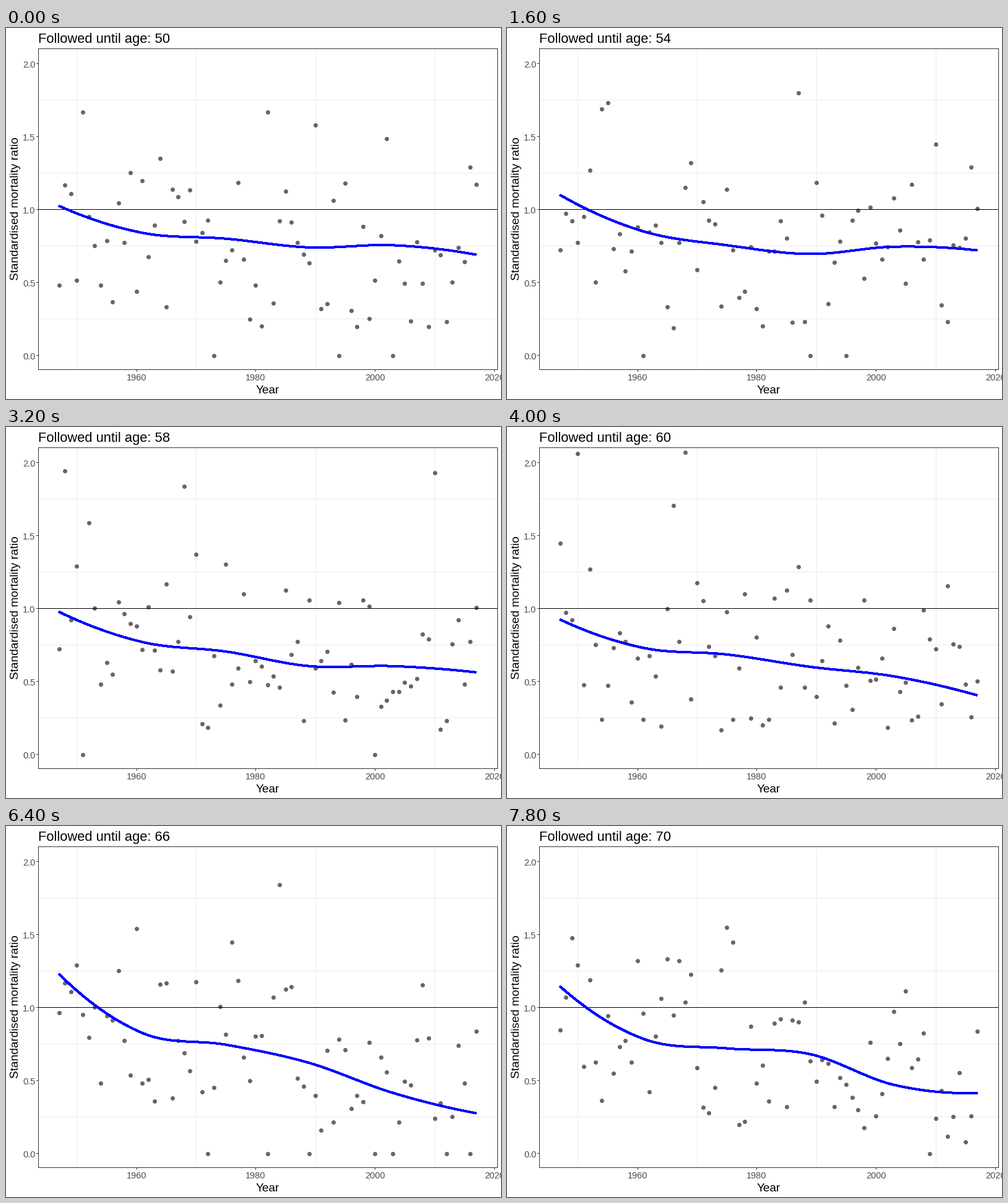
A matplotlib script for the animation above (8 s loop, 800x600 px).

```python
import numpy as np
import matplotlib.pyplot as plt
from matplotlib.animation import FuncAnimation

W, H, DPI = 800, 600, 100
PX = 72 / DPI                      # points per pixel
FRAMES, INTERVAL = 40, 200
INK, GRID, TICK_TEXT = "#333333", "#ebebeb", "#4d4d4d"

plt.rcParams["font.family"] = "Liberation Sans"

# Trend in 1947, 1961, 1975, 1989, 2003 and 2017, by age
TREND = {
    50: (1.025, 0.84, 0.80, 0.74, 0.755, 0.69),
    54: (1.10, 0.85, 0.755, 0.695, 0.745, 0.72),
    56: (1.03, 0.81, 0.725, 0.61, 0.675, 0.72),
    60: (0.925, 0.73, 0.685, 0.60, 0.535, 0.405),
    63: (1.17, 0.815, 0.765, 0.605, 0.47, 0.39),
    66: (1.23, 0.825, 0.745, 0.62, 0.415, 0.275),
    69: (1.145, 0.785, 0.72, 0.68, 0.47, 0.415),
}

years = np.arange(1947, 2018)
ages = np.arange(50, 71)
key_frames = np.round(1.98 * (ages - 50))


def x_of(year):
    return 85.5 + 9.636 * (year - 1947)


def y_of(ratio):
    return 529.5 - 236 * ratio


def crisp(v):
    """Centre of the nearest pixel."""
    return np.floor(v + 0.49) + 0.5


def smooth(knots):
    """Cubic Hermite curve through evenly spaced knots, one value per year."""
    p = np.array(knots)
    m = np.gradient(p, edge_order=2)
    u = np.linspace(0, len(p) - 1, len(years))
    i = np.minimum(u.astype(int), len(p) - 2)
    t = u - i
    return ((2 * t**3 - 3 * t**2 + 1) * p[i] + (t**3 - 2 * t**2 + t) * m[i]
            + (3 * t**2 - 2 * t**3) * p[i + 1] + (t**3 - t**2) * m[i + 1])


def blend(at, keys, rows):
    """Linear mix of the two rows around a position."""
    i = int(np.clip(np.searchsorted(keys, at, "right") - 1, 0, len(keys) - 2))
    t = np.clip((at - keys[i]) / (keys[i + 1] - keys[i]), 0, 1)
    return rows[i] * (1 - t) + rows[i + 1] * t


def make_ratios(curves, keep=0.6):
    """Observed over expected deaths; some deaths carry over to the next age."""
    rng = np.random.default_rng(11)
    expected = rng.uniform(3.8, 6.5, len(years))
    deaths = rng.poisson(expected * curves[0])
    rows = []
    for curve in curves:
        rows.append(np.minimum(deaths / expected, 2.07))
        deaths = (rng.binomial(deaths, keep)
                  + rng.poisson((1 - keep) * expected * curve))
    return rows


trend_rows = [smooth(k) for k in TREND.values()]
curves = [blend(a, list(TREND), trend_rows) for a in ages]
ratios = make_ratios(curves)

fig = plt.figure(figsize=(W / DPI, H / DPI), dpi=DPI, facecolor="white")
ax = fig.add_axes([0, 0, 1, 1])
ax.set(xlim=(0, W), ylim=(H, 0))
ax.axis("off")


def rule(x, y, color, z):
    ax.plot(x, y, color=color, lw=PX, zorder=z, snap=False,
            solid_capstyle="butt", solid_joinstyle="miter")


def label(x, y, s, px, color="black", ha="center", **kw):
    return ax.text(x, y, s, fontsize=px * PX, color=color, ha=ha,
                   va="baseline", **kw)


L, R, T, B = 52.5, 794.5, 33.5, 552.5
for year in (1950, 1970, 1990, 2010):
    rule([crisp(x_of(year))] * 2, [T, B], GRID, 1)
for ratio in (0.25, 0.75, 1.25, 1.75):
    rule([L, R], [crisp(y_of(ratio))] * 2, GRID, 1)
rule([L, R], [crisp(y_of(1))] * 2, "black", 3)
rule([L, R, R, L, L, R], [T, T, B, B, T, T], INK, 5)

for ratio in (0, 0.5, 1, 1.5, 2):
    y = crisp(y_of(ratio))
    rule([49, L], [y, y], INK, 5)
    label(47.5, y + 6, f"{ratio:.1f}", 14.5, TICK_TEXT, "right")
for year in (1960, 1980, 2000, 2020):
    x = crisp(x_of(year))
    rule([x, x], [B, 556], INK, 5)
    label(x, 570, str(year), 14.5, TICK_TEXT)

label(422.5, 591, "Year", 19)
label(20.5, 292.5, "Standardised mortality ratio", 19.2, rotation=90,
      rotation_mode="anchor")
title = label(52, 24, "", 22, ha="left")

xs = x_of(years)
points = ax.scatter(xs, y_of(ratios[0]), s=(7 * PX) ** 2, c="black", alpha=0.6,
                    linewidths=0, zorder=2)
trend, = ax.plot(xs, y_of(curves[0]), color="#0000ff", lw=3 * PX, zorder=4,
                 solid_capstyle="butt", antialiased=False)


def draw(frame):
    title.set_text(f"Followed until age: {round(50 + frame * 50 / 99)}")
    heights = y_of(blend(frame, key_frames, ratios))
    points.set_offsets(np.column_stack([xs, heights]))
    trend.set_ydata(y_of(blend(frame, key_frames, curves)))
    return title, points, trend


anim = FuncAnimation(fig, draw, frames=FRAMES, interval=INTERVAL,
                     init_func=lambda: draw(0), repeat=True, repeat_delay=0)
plt.show()
```
